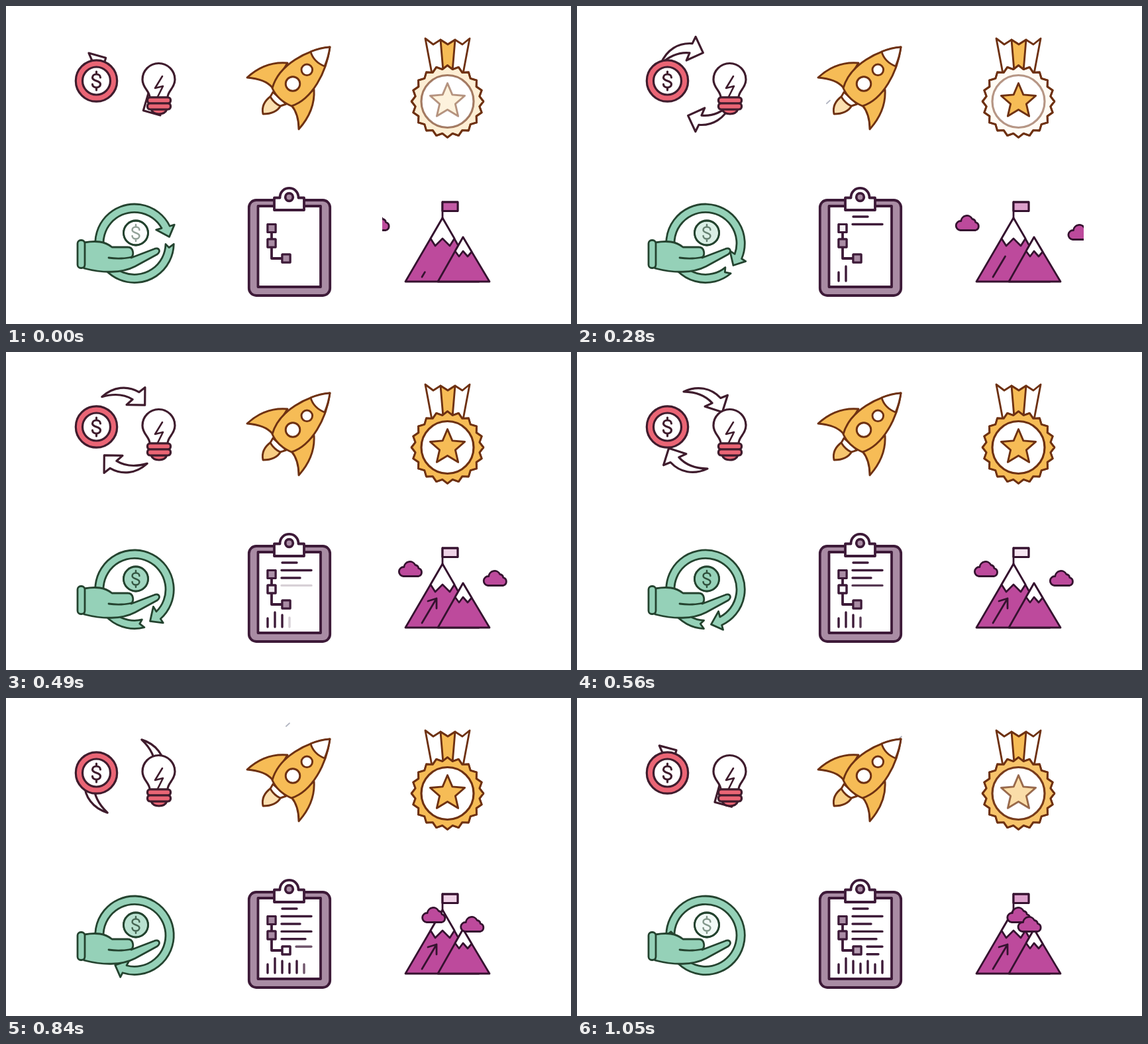
Recreate the animation shown at these times as an HTML page. Size 853 by 480 pixels, loop 1.12 s.

```html
<!DOCTYPE html>
<html lang="en">
<head>
<meta charset="utf-8">
<title>Business icons</title>
<style>
html, body { margin: 0; height: 100%; overflow: hidden; background: #fff; }
svg { display: block; width: 100%; height: 100%; }
g { stroke-linecap: round; stroke-linejoin: round; }
.white { fill: #fff; }
.line { fill: none; }
#trade { stroke: #3f1c2d; stroke-width: 3.2; fill: #ea6575; }
#rocket, #medal { stroke: #6e3112; stroke-width: 2.9; fill: #f6bc56; }
#invest { stroke: #24432f; stroke-width: 2.8; fill: #95d1b8; }
#plan { stroke: #3d1a38; stroke-width: 3.8; fill: #a98ca4; }
#peak { stroke: #35122f; stroke-width: 2.8; fill: #bd4a9c; }
#streaks { stroke: #b4b7c3; stroke-width: 1.8; }
</style>
</head>
<body>
<svg viewBox="0 0 853 480">
  <defs>
    <path id="dollar" class="line" d="M6-5C6-8 3.5-10 0-10S-6-8-6-5C-6 1 6-1 6 5C6 8 3.5 10 0 10S-6 8-6 5M0-14V-10M0 10V14"/>
    <path id="swap" d="M134 77C147 58 167 51 187 57L194 48L200 74L173 80L180 70C165 65 150 68 134 77Z"/>
    <path id="cloud" d="M7 0A7 7 0 0 1 8-14A9 9 0 0 1 25-17A6 6 0 0 1 30-12A6.2 6.2 0 0 1 30 0Z"/>
    <rect id="box" x="-6" y="-6" width="12" height="12"/>
    <clipPath id="sky"><path d="M568 280H765V440H568Z"/></clipPath>
  </defs>

  <g id="trade">
    <g id="swaps" class="white">
      <use href="#swap"/>
      <use href="#swap" transform="rotate(180 179 118)"/>
    </g>
    <circle cx="136.5" cy="113" r="31.2"/>
    <circle cx="136.5" cy="113" r="21" class="white"/>
    <use href="#dollar" x="136.5" y="113"/>
    <path class="white" d="M217 138C217 128 206 124 206 111A24.5 24.5 0 0 1 255 111C255 124 244 128 244 138Z"/>
    <path class="line" stroke-width="2.6" d="M236 106L225 124L237 121L229 137"/>
    <path d="M219 156H243C241 161 237 163 231 163S221 161 219 156Z"/>
    <rect x="213.5" y="138" width="35" height="9" rx="4"/>
    <rect x="213.5" y="147" width="35" height="9" rx="4"/>
  </g>

  <g id="streaks"></g>
  <g id="rocket">
    <path id="flame" d="M400 136C389 144 386 154 388 163C400 163 410 159 415 150Z"/>
    <path class="white" d="M403 130L399 137Q405 147 414 151L423 148Z"/>
    <path d="M425 86Q391 83 364 108Q391 110 402 123Z"/>
    <path d="M465 126Q467 158 442 186Q442 163 431 150Z"/>
    <path d="M489 62C455 66 412 88 402 124Q410 142 431 151C462 141 484 100 489 62Z"/>
    <path class="white" d="M489 62Q474 63 460 69Q464 84 481 91Q487 77 489 62Z"/>
    <circle cx="454.3" cy="96.3" r="8.3" class="white"/>
    <circle cx="433" cy="117.5" r="10.8" class="white"/>
  </g>

  <g id="medal">
    <path class="white" d="M633 49L645 58L656 51L667 58L678 51L689 58L700 49L690 102H643Z"/>
    <path d="M656 51L667 58L678 51L674 98H660Z"/>
    <path id="backing" class="white"/>
    <path id="badge"/>
    <circle id="ring" cx="666.5" cy="144" r="39.5" class="white" stroke-width="3.2"/>
    <path id="star"/>
  </g>

  <g id="invest">
    <path id="orbit"/>
    <circle cx="196" cy="342.5" r="18.5" class="white"/>
    <circle id="coin" cx="196" cy="342.5" r="18.5"/>
    <use id="sign" href="#dollar" transform="translate(196 342.5) scale(.9)"/>
    <path d="M118 357C136 354 149 355 160 364H184C192 364 194 375 189 380L223 367C232 363 234 371 228 375L195 393C174 404 145 403 118 396Z"/>
    <path class="line" d="M155 380C168 382 182 381 189 379"/>
    <rect x="108" y="353.5" width="11" height="42" rx="5"/>
  </g>

  <g id="plan">
    <rect x="366.8" y="293" width="122.4" height="144" rx="11"/>
    <rect x="380.5" y="302" width="94.5" height="122" class="white"/>
    <path class="white" d="M405 289.5H413.5C413.5 270 441.5 270 441.5 289.5H450V308H405Z"/>
    <circle cx="427.5" cy="288.5" r="5.8"/>
    <path class="line" d="M401 335V381H423"/>
    <g class="white" stroke-width="3">
      <use href="#box" x="401" y="335.5"/>
      <use href="#box" x="401" y="358"/>
      <use href="#box" x="423" y="381"/>
    </g>
    <g id="boxes" stroke-width="3">
      <use href="#box" x="401" y="335.5"/>
      <use href="#box" x="401" y="358"/>
      <use href="#box" x="423" y="381"/>
    </g>
    <!-- Each path is one text line and one chart bar -->
    <g id="notes" stroke-width="3.4">
      <path d="M417 318H439M395 415V402"/>
      <path d="M416 329.5H461M406 415V393"/>
      <path d="M416 341H444M417 415V397"/>
      <path d="M416 352.4H461M428 415V401"/>
      <path d="M416 363.8H452M439 415V397"/>
      <path d="M438 375.3H461M450 415V402"/>
      <path d="M438 386.7H455M461 415V397"/>
    </g>
  </g>

  <g id="peak" clip-path="url(#sky)">
    <path d="M659 320V296" class="line"/>
    <rect x="659" y="296" width="23" height="13.5" class="white"/>
    <rect id="flag" x="659" y="296" width="23" height="13.5"/>
    <path d="M603 416L659 320L714 416Z"/>
    <path class="white" d="M659 320L641 351L648 362L659 351L670 362L677 351Z"/>
    <path d="M652 416L690 349L730 416Z"/>
    <path class="white" d="M690 349L678 370L684 378L690 370L697 378L703 371Z"/>
    <path id="climb" class="line"/>
    <use id="cloudL" href="#cloud" y="338.5"/>
    <use id="cloudR" href="#cloud" y="352.5"/>
  </g>
</svg>
<script>
const STEP = 70, COUNT = 16;
const $ = id => document.getElementById(id);
const set = (el, attrs) => { for (const k in attrs) el.setAttribute(k, attrs[k]); };
const clamp = v => Math.max(0, Math.min(1, v));
const smooth = p => p * p * (3 - 2 * p);
const wave = (n, peak, period) => (1 + Math.cos(2 * Math.PI * (n - peak) / period)) / 2;
const polar = (cx, cy, r, deg) => {
  const a = deg * Math.PI / 180;
  return (cx + r * Math.cos(a)).toFixed(2) + ' ' + (cy + r * Math.sin(a)).toFixed(2);
};

// Fades in from step `on` and out from step `off`, wrapping around the loop
const shown = (n, on, off, fade) => {
  const age = (n - on + COUNT) % COUNT;
  return clamp(Math.min(age, off - on + fade - age) / fade);
};

// Three eased turns of 60 degrees
const spin = n => {
  const p = (n - .4) / 5.05, turn = Math.floor(p);
  return 60 * (turn + smooth(p - turn));
};

// Alternating radii around the medal's centre
const spikes = (count, outer, inner) => 'M' + Array.from({ length: count * 2 }, (_, i) =>
  polar(666.5, 144, i % 2 ? inner : outer, i * 180 / count - 90)).join('L') + 'Z';
for (const id of ['backing', 'badge']) set($(id), { d: spikes(20, 54.3, 49) });
set($('star'), { d: spikes(5, 27.5, 12.5) });

// Circular arrow with a notched tail
const o = (r, deg) => polar(194, 358.3, r, deg);
set($('orbit'), { d: `M${o(59.3, 2)}A59.3 59.3 0 1 1 ${o(59.3, -25)}L${o(66.5, -24)}L${o(53.5, -9.6)}` +
  `L${o(38.5, -31)}L${o(47, -28)}A47 47 0 1 0 ${o(47, 2.5)}L${o(52.5, 8)}Z` });

// Each streak is a short dash at its first step, then a long line
const streaks = [[486, 127, 2], [362, 170, 2], [382, 142.5, 4], [428, 38, 12], [490, 58, 15]];
const streakPath = n => streaks.map(([x, y, start]) => {
  const age = n - start;
  if (age < 0 || age > 1) return '';
  const from = 8 * age, to = 7 + 53 * age;
  const point = d => `${x - d * .735} ${y + d * .678}`;
  return `M${point(from)}L${point(to)}`;
}).join('');
$('streaks').innerHTML = '<path/>';

function draw(n) {
  const angle = spin(n);
  set($('swaps'), { transform: `rotate(${angle - 60} 179 118)` });
  set($('orbit'), { transform: `rotate(${angle} 194 358.3)` });

  set($('flame'), { 'fill-opacity': .35 + .5 * wave(n, 2, 6) });
  set($('streaks').firstChild, { d: streakPath(n) });

  const star = shown(n, 1.5, 13.9, 1.8);
  set($('badge'), { 'fill-opacity': shown(n, 3.9, 14.8, 1.6) });
  set($('ring'), { 'stroke-opacity': .5 + .5 * shown(n, 4.7, 14.8, 1.6) });
  set($('star'), { 'fill-opacity': .2 + .8 * star, 'stroke-opacity': .5 + .5 * star });

  const coin = wave(n, 8.8, COUNT);
  set($('coin'), { 'fill-opacity': coin });
  set($('sign'), { 'stroke-opacity': .48 + .44 * coin });

  [...$('boxes').children].forEach((el, i) =>
    set(el, { 'fill-opacity': clamp(Math.abs(n - 3.6 - 4.2 * i) / 3.6) }));
  [...$('notes').children].forEach((el, i) =>
    set(el, { opacity: clamp((n - .4 - 2.1 * i) / 1.5) }));

  set($('flag'), { 'fill-opacity': Math.abs(n - 9.5) / 10.5 });
  const p = clamp(.2 + n * .16);
  set($('climb'), { d: `M628 409L${628 + 22 * p} ${409 - 37 * p}` + (p === 1 ? 'M637 376L650 372V387' : '') });
  set($('cloudL'), { x: 543.5 + 7.05 * n });
  set($('cloudR'), { x: 769 - 6.9 * n });
}

const begin = performance.now();
function tick() {
  draw(Math.floor((performance.now() - begin) / STEP) % COUNT);
  requestAnimationFrame(tick);
}
tick();
</script>
</body>
</html>
```
